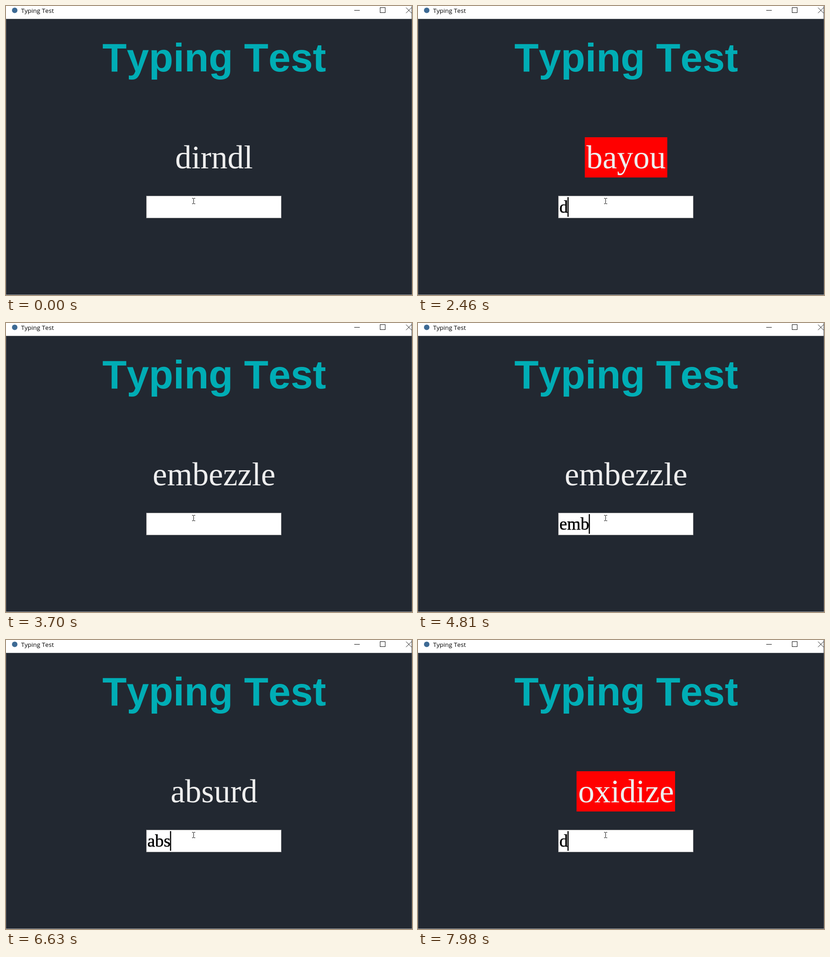
Write an HTML page that moves like this. It is 886 by 632 pixels and loops after 8 s.

```html
<!DOCTYPE html>
<html lang="en">
<head>
<meta charset="utf-8">
<title>Typing Test</title>
<style>
  html, body { margin: 0; width: 100%; height: 100%; overflow: hidden; background: #222831; }
  svg { display: block; }
  .serif { font-family: "Liberation Serif", "Times New Roman", serif; }
  #title { font: bold 87px "Liberation Sans", Arial, sans-serif; fill: #00adb5; }
  #caption { font: 13.5px "Open Sans", "Noto Sans", sans-serif; }
  #word { font-size: 71px; fill: #eee; text-anchor: middle; }
  #typed { font-size: 38px; stroke: #000; stroke-width: .5px; }
  #title, #caption, .serif { font-kerning: none; }
  .line { fill: none; stroke: #111; shape-rendering: crispEdges; }
</style>
</head>
<body>
<svg width="886" height="632" viewBox="0 0 886 632">
  <rect width="886" height="632" fill="#222831"/>
  <rect width="886" height="28" fill="#fff"/>
  <path d="M0 28.5H886" stroke="#5c6167"/>
  <path d="M.5 28V632M885.5 0V632" stroke="#50555d"/>
  <path d="M0 631.5H886" stroke="#a5a8ac"/>

  <circle cx="19" cy="9.5" r="6" fill="#3d6a94"/>
  <text id="caption" x="33" y="15">Typing Test</text>
  <path class="line" d="M760 9.5H772M816.5 3.5H827.5V14.5H816.5Z"/>
  <path d="M873 3.5L885 15.5M885 3.5L873 15.5" stroke="#111"/>

  <text id="title" x="210.3" y="143">Typing Test</text>

  <rect id="alert" y="287" height="88" fill="#f00"/>
  <text id="word" class="serif" x="454" y="355"></text>

  <rect x="306.5" y="415.5" width="294" height="48" fill="#fff" stroke="#a0a0a0"/>
  <text id="typed" class="serif" x="308.4" y="452"></text>
  <rect id="caret" y="418" width="2.5" height="43"/>
  <path class="line" d="M406 420.5H409M410 420.5H413M409.5 421V432M406 432.5H409M410 432.5H413"/>
</svg>
<script>
const LOOP = 8000;
const [alertBox, word, typed, caret] =
  ['alert', 'word', 'typed', 'caret'].map(id => document.getElementById(id));

// Start of each word, then [time, typed text]
const words = [[0, 'dirndl'], [2090, 'bayou'], [3700, 'embezzle'], [5440, 'absurd'], [6900, 'oxidize']];
const keys = [
  [0, ''], [740, 'd'], [920, 'di'], [1200, 'dir'], [1380, 'dirn'], [1570, 'dirnd'], [1660, 'dirndl'],
  [2090, ''], [2460, 'd'], [2740, ''], [3100, 'b'], [3280, 'ba'], [3370, 'bay'], [3460, 'bayo'], [3560, 'bayou'],
  [3700, ''], [4530, 'e'], [4620, 'em'], [4810, 'emb'], [4990, 'embe'], [5080, 'embez'], [5170, 'embezz'], [5260, 'embezzle'],
  [5440, ''], [6270, 'a'], [6360, 'ab'], [6630, 'abs'], [6720, 'absu'], [6810, 'absurd'],
  [6900, ''], [7980, 'd']
];
// Times at which the caret toggles, hidden at first
const blinks = [370, 920, 1200, 1850, 2090, 2740, 3010, 3560, 3880, 4530, 4710, 5260, 5620, 6180, 6540, 7170, 7450];

const valueAt = (list, t) => list.findLast(([start]) => start <= t)[1];
let shown = '';

function draw(now) {
  const t = now % LOOP;
  const target = valueAt(words, t);
  const input = valueAt(keys, t);
  const caretOn = blinks.filter(b => b <= t).length % 2 === 1;
  const state = [target, input, caretOn].join();
  if (state !== shown) {
    shown = state;
    word.textContent = target;
    typed.textContent = input;
    const width = Math.round(word.getComputedTextLength() + 6);
    alertBox.setAttribute('width', width);
    alertBox.setAttribute('x', Math.floor(454 - width / 2));
    alertBox.style.display = target.startsWith(input) ? 'none' : '';
    const end = input ? typed.getComputedTextLength() : 0;
    caret.setAttribute('x', 307.2 + end);
    caret.style.display = caretOn ? '' : 'none';
  }
  requestAnimationFrame(() => draw(performance.now()));
}
draw(performance.now());
</script>
</body>
</html>
```
